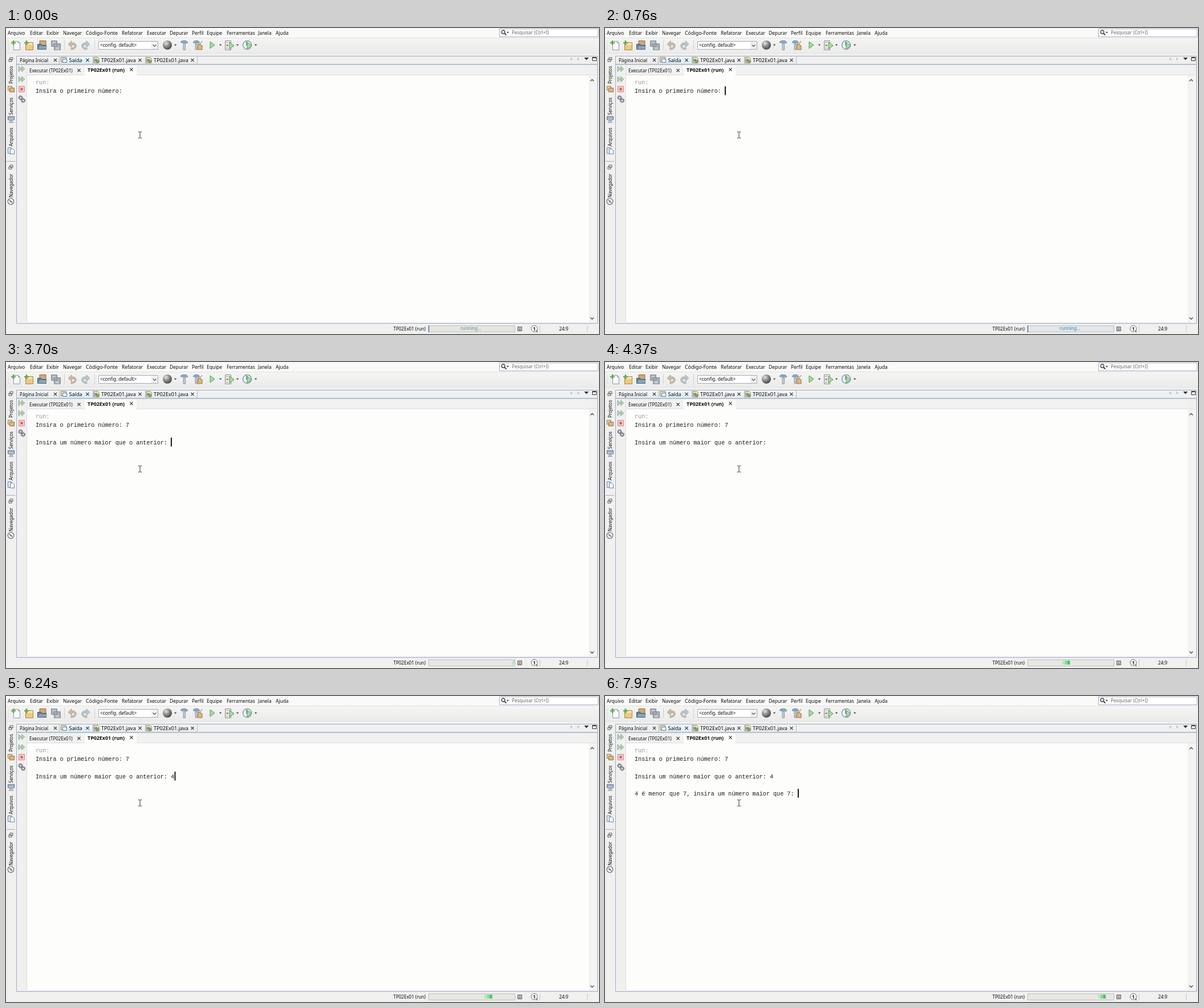
An HTML page that plays this animation: 1040x538 px, repeating every 8 s.

```html
<!DOCTYPE html>
<html lang="pt">
<head>
<meta charset="utf-8">
<title>Saída</title>
<style>
html, body { margin: 0; width: 100%; height: 100%; overflow: hidden; background: #f0f0ef; }
svg { display: block; width: 1040px; height: 538px; }
text { font: 8.1px "Noto Sans", "Open Sans", sans-serif; fill: #0c0c0c; white-space: pre; }
.menu text { font-size: 8.35px; }
.menu .wide { font-size: 8.9px; }
.tabs text { font-size: 9.1px; }
.tabs .small { font-size: 8px; }
.tabs .bold { font-weight: 700; font-size: 8.9px; }
.side text { font-size: 8px; }
.console text { font: 10.13px "Liberation Mono", "Courier New", monospace; fill: #1c1c1c; }
.console .dim { fill: #8f97a3; }
.line { fill: none; stroke: #555; }

.console *, .bar * { animation: 8s step-end infinite; }
.console .first { animation-name: first; }
.console .ask { animation-name: ask; }
.console .second { animation-name: second; }
.console .retry { animation-name: retry; }
.console .caret { animation-name: blink, hop; }
.bar .idle { animation-name: idle; }
.bar .tint { animation: tint 8s linear infinite; }
.bar .label { animation: label 8s linear infinite; }
.bar .blocks { animation-name: march, ask; }
.bar .blocks * { animation: none; }

@keyframes first { 0% { visibility: hidden } 38.375%, 100% { visibility: visible } }
@keyframes ask { 0% { visibility: hidden } 46.25%, 100% { visibility: visible } }
@keyframes second { 0% { visibility: hidden } 75.25%, 100% { visibility: visible } }
@keyframes retry { 0% { visibility: hidden } 80.625%, 100% { visibility: visible } }
@keyframes idle { 0% { visibility: visible } 46.25%, 100% { visibility: hidden } }
@keyframes tint { 0% { fill: #e5e6e0 } 10%, 100% { fill: #e1e7ea } }
@keyframes label { 0% { fill: #558da3 } 10%, 100% { fill: #3283bd } }
@keyframes blink {
  0%, 11.25%, 23.75%, 36.625%, 41.25%, 52.625%, 65.375%, 87%, 99.75%, 100% { opacity: 0 }
  5%, 17.5%, 30.375%, 38.375%, 44.125%, 59%, 71.75%, 93.375% { opacity: 1 }
}
@keyframes hop {
  0% { transform: translate(210px, 102.5px) }
  38.375% { transform: translate(216.5px, 102.5px) }
  44.125% { transform: translate(52px, 133px) }
  46.25% { transform: translate(289px, 133px) }
  75.25% { transform: translate(295.5px, 133px) }
  80.625%, 100% { transform: translate(338px, 163.3px) }
}
@keyframes march {
  0%, 46.25% { transform: translateX(144.4px); animation-timing-function: steps(3) }
  47.299% { transform: translateX(153px) }
  47.3% { transform: none; animation-timing-function: steps(45) }
  66.049% { transform: translateX(153px) }
  66.05% { transform: none; animation-timing-function: steps(45) }
  84.799% { transform: translateX(153px) }
  84.8% { transform: none; animation-timing-function: steps(36) }
  100% { transform: translateX(124px) }
}
</style>
</head>
<body>
<svg viewBox="0 0 1040 538">
  <defs>
    <linearGradient id="steel" x2="0" y2="1"><stop stop-color="#f4f4f3"/><stop offset="1" stop-color="#ebebea"/></linearGradient>
    <linearGradient id="sky" x2="0" y2="1"><stop stop-color="#f0f7fb"/><stop offset="1" stop-color="#d8eaf4"/></linearGradient>
    <radialGradient id="ball" cx=".35" cy=".3" r=".75"><stop stop-color="#e4e4e4"/><stop offset=".5" stop-color="#8a8a8a"/><stop offset="1" stop-color="#444"/></radialGradient>
    <clipPath id="trough"><path d="M742 524h150v10h-150z"/></clipPath>
    <path id="close" d="M-2.6-2.6 2.6 2.6M2.6-2.6-2.6 2.6" stroke="#333" stroke-width="1.2"/>
    <path id="drop" d="M-2.2-1.2h4.4L0 1.4z" fill="#444"/>
    <path id="rule" d="M.5 21v18" stroke="#d0d0d0"/>
    <path id="plus" d="M0-4V4M-4 0H4" stroke="#5fae4c" stroke-width="2.6"/>
    <path id="play" d="M0 0v12l8-6z" fill="#a3e09a" stroke="#4d9f50"/>
    <g id="float" class="line"><path d="M-1.5-3.5h5v4h-5zM-3.5-.5h5v4h-5z" fill="#f4f4f4"/></g>
    <g id="java">
      <path d="M-5-5h7l2 2v8h-9z" fill="#f1e6b8" stroke="#94875c"/>
      <path d="M-4-2h5v5h-5z" fill="#8d93a0"/>
      <path d="M0-1v6l5-3z" fill="#7cc170" stroke="#3f7f3a" stroke-width=".8"/>
    </g>
    <g id="rerun" fill="#b4cdb2" stroke="#8fab90" stroke-width=".8"><path d="M0 0v10l5.500-5zM5.500 0v10l5.500-5z"/></g>
    <g id="gear" fill="none"><circle r="2.300" stroke="#777e88" stroke-width="1.600"/><circle r="3.500" stroke="#777e88" stroke-width="1.500" stroke-dasharray="1.500 1.250"/></g>
  </defs>

  <path d="M0 0h1040v538H0z" fill="#f0f0ef"/>
  <path d="M0 0h1040v18H0z" fill="#f9f9f8"/>
  <path d="M0 18h1040v26H0z" fill="url(#steel)"/>
  <path d="M0 17.500h1040M0 44.500h1040" stroke="#e2e2e1"/>

  <g class="menu">
    <text x="3" y="12">Arquivo</text>
    <text x="42" y="12">Editar</text>
    <text x="71" y="12">Exibir</text>
    <text x="100" y="12">Navegar</text>
    <text class="wide" x="140" y="12">Código-Fonte</text>
    <text x="203" y="12">Refatorar</text>
    <text x="247" y="12">Executar</text>
    <text x="287" y="12">Depurar</text>
    <text x="326" y="12">Perfil</text>
    <text x="352" y="12">Equipe</text>
    <text x="387" y="12">Ferramentas</text>
    <text x="442" y="12">Janela</text>
    <text x="473" y="12">Ajuda</text>
  </g>
  <path d="M865.500 1.500h173v14h-173z" fill="#fff" stroke="#a3adc2"/>
  <circle cx="872" cy="7" r="3" fill="#dcebf5" stroke="#444" stroke-width="1.300"/>
  <path d="m874.500 9.500 3 3" stroke="#444" stroke-width="1.800"/>
  <use href="#drop" x="880" y="8"/>
  <text x="887" y="11" style="fill:#666">Pesquisar (Ctrl+I)</text>

  <g class="tools">
    <path d="M4.500 22v17" stroke="#b5b5b5" stroke-dasharray="1 2"/>
    <path d="M13.500 23.500h8l3 3v12h-11z" fill="#fcfcfc" stroke="#8996aa"/>
    <path d="M21.500 23.500v3h3" class="line" style="stroke:#8996aa"/>
    <use href="#plus" x="13" y="26"/>
    <path d="M34.500 25.500h13v13h-13z" fill="#edc981" stroke="#ab8446"/>
    <path d="M35 26h12v4H35z" fill="#f7e1b2"/>
    <use href="#plus" x="36" y="26"/>
    <path d="M59 22.500h11v8H59z" fill="#cfa971" stroke="#8d6d42"/>
    <path d="M55.500 28.500h6l2 2h7v7h-15z" fill="#6583a0" stroke="#425a73"/>
    <path d="m56 37 3-5h13l-2 5z" fill="#8aa6bf"/>
    <g fill="#a7adb5" stroke="#868d96">
      <path d="M79.500 22.500h10v10h-10zM84.500 27.500h11v11h-11z"/>
      <path d="M82 24h5v3h-5zM87 33.500h6v4.500h-6z" fill="#c3c8ce" stroke="none"/>
    </g>
    <use href="#rule" x="102"/>
    <path d="M114 38c11 0 12-11 4-12h-3v-3.500l-6 6 6 5.500v-4h3c4 0 4 5-4 5z" fill="#c9bba6" stroke="#aa9c88" stroke-width=".8"/>
    <path d="M142 38c-11 0-12-11-4-12h3v-3.500l6 6-6 5.500v-4h-3c-4 0-4 5 4 5z" fill="#b9c5cb" stroke="#98a5ac" stroke-width=".8"/>
    <use href="#rule" x="155"/>
    <path d="M162.500 23.500h104v14h-104z" fill="#fff" stroke="#a4a9b6"/>
    <path d="M254.500 24h11.500v13h-11.500z" fill="#f0f1f2"/>
    <path d="m257.500 29.500 3 3 3-3" class="line" style="stroke-width:1.200"/>
    <text x="165" y="33">&lt;config. default&gt;</text>
    <circle cx="283" cy="30" r="8" fill="url(#ball)"/>
    <use href="#drop" x="297" y="30"/>
    <path d="M306 25l3-2.500h7l3 3-2 1.500-2-1h-7z" fill="#8cb0cd" stroke="#54738f" stroke-width=".8"/>
    <path d="M311 27h3.500v11.500H311z" fill="#c3cdd6" stroke="#73879a" stroke-width=".8"/>
    <path d="M328 25l3-2.500h6l3 3-2 1.500-2-1h-7z" fill="#8cb0cd" stroke="#54738f" stroke-width=".8"/>
    <path d="M332 27h3v11h-3z" fill="#c3cdd6" stroke="#73879a" stroke-width=".8"/>
    <path d="m344 23-4 6m-3-1 7 3v7h-8z" fill="#dfb778" stroke="#99713a"/>
    <use href="#play" x="358" y="24"/>
    <use href="#drop" x="376" y="30"/>
    <path d="M384.500 22.500h10v16h-10z" fill="#ececec" stroke="#8d8d8d"/>
    <path d="M386.500 25.500h2m-2 10h2M391 25.500h2M391 35.500h2" stroke="#666"/>
    <path d="M386 29h4v3h-4z" fill="#d88a86"/>
    <use href="#play" x="392" y="25"/>
    <use href="#drop" x="406" y="30"/>
    <circle cx="423" cy="30" r="7.500" fill="#edf3f7" stroke="#8097ab" stroke-width="1.400"/>
    <path d="M422 24v7" stroke="#415c78" stroke-width="1.200"/>
    <use href="#play" x="423" y="25"/>
    <use href="#drop" x="438" y="30"/>
  </g>

  <g class="side">
    <use href="#float" x="8.500" y="55.500"/>
    <text transform="translate(11.500 98) rotate(-90)">Projetos</text>
    <path d="M3.500 102.500h7v7h-7z" fill="#ecd7a9" stroke="#967645"/>
    <path d="M6.500 105.500h8v7h-8z" fill="#deb678" stroke="#967645"/>
    <text transform="translate(11.500 153) rotate(-90)">Serviços</text>
    <path d="M3.500 155.500h11v6h-11z" fill="#c3d4e8" stroke="#58718f"/>
    <path d="M4 158h10M6 163.500h6M5 166h8" stroke="#58718f"/>
    <text transform="translate(11.500 208) rotate(-90)">Arquivos</text>
    <path d="M3.500 210.500h6v10h-6z" fill="#e4eef8" stroke="#6083ab"/>
    <path d="M7.500 212.500h4l3 3v6h-7z" fill="#f9fbff" stroke="#6083ab"/>
    <path d="M1 234.500h15" stroke="#a5a9c7"/>
    <use href="#float" x="8.500" y="244.500"/>
    <text transform="translate(11.500 298) rotate(-90)">Navegador</text>
    <circle cx="8.500" cy="305" r="5.300" fill="#f7f7f7" stroke="#69717e" stroke-width="1.300"/>
    <path d="m5 301.500 5 2.500-2.500 2.500z" fill="#d0655f"/>
    <path d="m12 308.500-4.500-2.500 2.500-2z" fill="#6883aa"/>
  </g>

  <g class="tabs">
    <path d="M18.500 49.500h1019v470h-1019z" fill="#f0f0ef" stroke="#a3a9c8"/>
    <path d="M19 50h317v13H19z" fill="url(#steel)"/>
    <path d="M94 50h58v14H94z" fill="url(#sky)"/>
    <path d="M93.500 50v13M152.500 50v13M244.500 50v13M335.500 50v13" stroke="#b4bccb"/>
    <path d="M19 64h1018" stroke="#b3bfd2" stroke-width="2"/>
    <text class="small" x="24" y="59.500">Página Inicial</text>
    <path d="M96.500 51.500h9v8h-9z" fill="#f1dfae" stroke="#93804e"/>
    <path d="M99.500 54.500h7v6h-7z" fill="#eef4fb" stroke="#5d7ba3"/>
    <text x="110.500" y="59.500">Saída</text>
    <use href="#java" x="159" y="56.500"/>
    <text x="167" y="59.500">TP02Ex01.java</text>
    <use href="#java" x="251" y="56.500"/>
    <text x="259" y="59.500">TP02Ex01.java</text>
    <use href="#close" x="86.500" y="56.500"/>
    <use href="#close" x="143" y="56.500"/>
    <use href="#close" x="235" y="56.500"/>
    <use href="#close" x="327" y="56.500"/>
    <path d="m993 51.500-4 3 4 3zM1002 51.500l4 3-4 3z" fill="#c9c9c9"/>
    <path d="M1014 52h8l-4 4.500z" fill="#333"/>
    <path d="M1028.500 51.500h7v6h-7zM1028 52.500h8" class="line" style="stroke:#333"/>
    <path d="M37 66h985v16H37z" fill="#f0f1f0"/>
    <path d="M138 66h91v17h-91z" fill="#fdfdfc"/>
    <path d="M37 82.500h101M229 82.500h807" stroke="#dcdedf"/>
    <text class="small" x="41" y="77.500">Executar (TP02Ex01)</text>
    <use href="#close" x="128" y="74.500"/>
    <text class="bold" x="143" y="76.500">TP02Ex01 (run)</text>
    <use href="#close" x="220" y="73"/>
  </g>

  <path d="M37 83h985v434H37z" fill="#fdfdfb"/>
  <path d="M36.500 66v451" stroke="#dededd"/>
  <path d="M1022 83h14v434h-14z" fill="#f3f3f2"/>
  <path d="m1025 93.500 3-3 3 3M1025 509l3 3 3-3" class="line" style="stroke-width:1.500"/>
  <use href="#rerun" x="22" y="67"/>
  <use href="#rerun" x="22" y="85"/>
  <path d="M22.500 102.500h10v10h-10z" fill="#f4cac6" stroke="#d48d89"/>
  <path d="M25.500 105.500h4v4h-4z" fill="#d95753"/>
  <use href="#gear" x="25.500" y="122.500"/>
  <use href="#gear" x="30" y="127.500"/>

  <g class="console">
    <text class="dim" x="52" y="99">run:</text>
    <text x="52" y="114.300">Insira o primeiro número:</text>
    <text class="first" x="210" y="114.300">7</text>
    <text class="ask" x="52" y="144.700">Insira um número maior que o anterior:</text>
    <text class="second" x="289" y="144.700">4</text>
    <text class="retry" x="52" y="175">4 é menor que 7, insira um número maior que 7:</text>
    <path class="caret" d="M0 0h1.800v15.500H0z"/>
  </g>
  <path d="M232 182.500h2l1 1 1-1h2M232 193.500h2l1-1 1 1h2M235 183v10" class="line" style="stroke:#333"/>

  <text x="679.500" y="531.500" style="font-size:8px">TP02Ex01 (run)</text>
  <g class="bar">
    <path d="M741.500 523.500h151v11h-151z" fill="#e7e8e3" stroke="#bcbfba"/>
    <g class="idle">
      <path class="tint" d="M742 524h150v10H742z"/>
      <path d="M741.500 523v12" stroke="#4c6fae" stroke-width="1.500"/>
      <text class="label" x="797" y="531.300" style="font-size:8px">running...</text>
    </g>
    <g clip-path="url(#trough)">
      <g class="blocks">
        <path d="M744 525h4v7h-4z" fill="#b9e6bd"/>
        <path d="M748.500 525h4v7h-4z" fill="#7edb8c"/>
        <path d="M753 525h4.500v7H753z" fill="#39ca55"/>
      </g>
    </g>
  </g>
  <path d="M897.500 525.500h7v7h-7z" fill="#d7d7d7" stroke="#555"/>
  <path d="M899 527.500h4M899 529.500h4M899 531h4" stroke="#666" stroke-width=".8"/>
  <path d="m929 532 3 4v-5z" fill="#666"/>
  <circle cx="926.500" cy="528.500" r="5.500" fill="#fbfbfb" stroke="#666"/>
  <text x="924.300" y="531.700" style="font-weight:700">1</text>
  <path d="M936.500 523v12M1019.500 523v12" stroke="#c8c8c8"/>
  <text x="970" y="532">24:9</text>
</svg>
</body>
</html>
```
